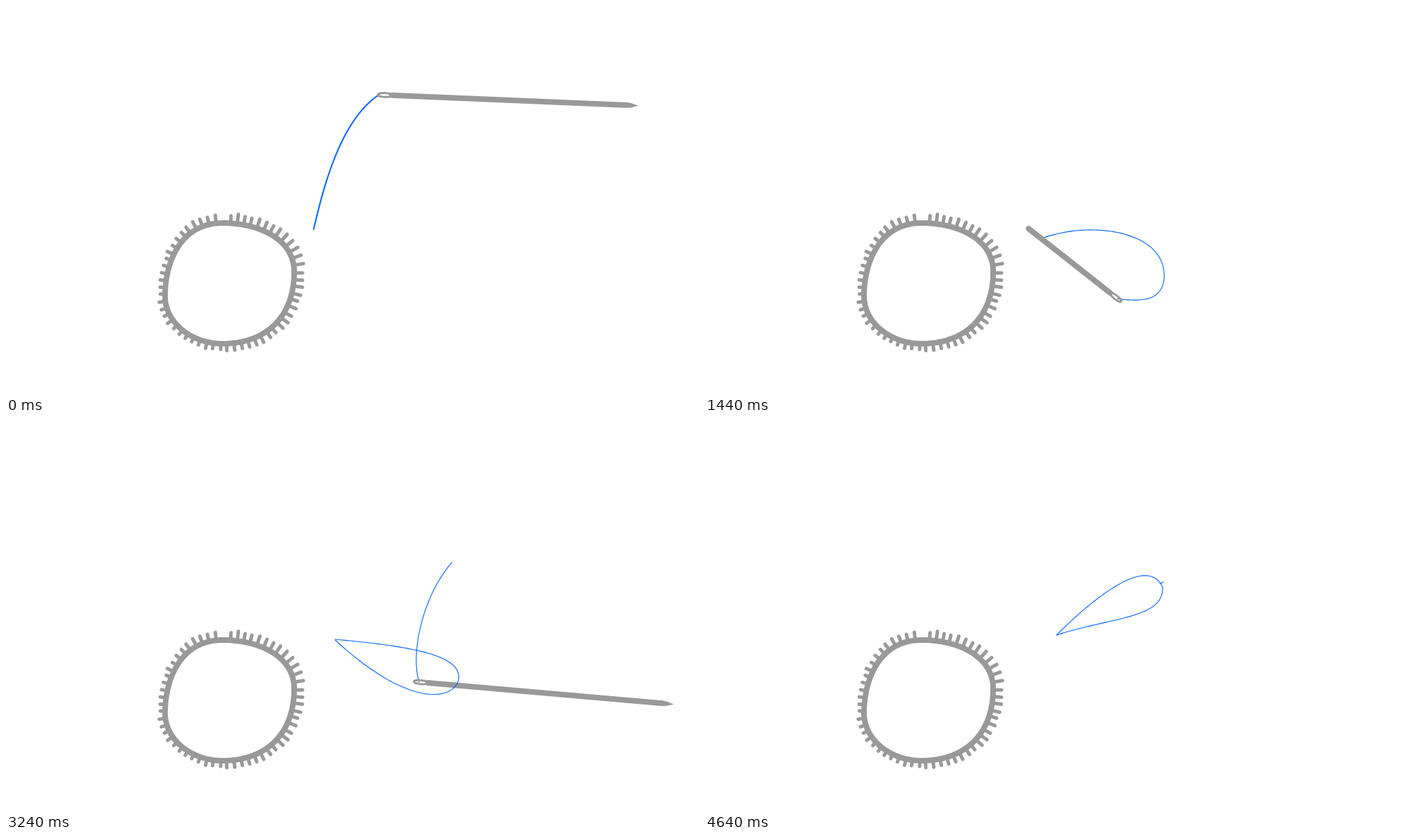
An HTML page with a canvas for the animation above (4760 ms loop, 998x561 px).

```html
<!DOCTYPE html>
<html lang="en">
<head>
<meta charset="utf-8">
<title>Chain stitch</title>
<style>
html, body { margin: 0; width: 100%; height: 100%; overflow: hidden; background: #fff; }
canvas { display: block; width: 998px; height: 561px; }
</style>
</head>
<body>
<canvas id="stage" width="998" height="561"></canvas>
<script>
const LOOP = 4760, STEP = 40, GREY = '#999', BLUE = '#0064fa';
const LENGTH = 375, SAMPLES = 80;
const HOLE_IN = [466, 321], HOLE_UP = [645.5, 206], HOLE_END = [658, 217];
// Needle phases in ms
const PIERCE = 1100, GONE = 1730, EMERGE = 2080, FREE = 2760, DIVE = 3920, DONE = 4520;
const ctx = document.getElementById('stage').getContext('2d');

const mix = (a, b, k) => a + (b - a) * k;
const dist = (a, b) => Math.hypot(a[0] - b[0], a[1] - b[1]);
const rad = deg => deg * Math.PI / 180;

// Samples a chain of cubic Beziers written as "x,y x,y ..."
function curve(text, count = SAMPLES) {
  const pts = text.trim().split(/\s+/).map(p => p.split(',').map(Number));
  const parts = (pts.length - 1) / 3;
  return Array.from({ length: count + 1 }, (_, j) => {
    const u = j / count * parts, i = Math.min(parts - 1, Math.floor(u));
    const k = u - i, q = 1 - k;
    const [a, b, c, d] = pts.slice(3 * i, 3 * i + 4);
    return [0, 1].map(m =>
      q * q * q * a[m] + 3 * q * q * k * b[m] + 3 * q * k * k * c[m] + k * k * k * d[m]);
  });
}

const pose = (t, text) => ({ t, pts: curve(text) });

function span(keys, t, time) {
  let i = 0;
  while (i < keys.length - 2 && t >= time(keys[i + 1])) i++;
  const t0 = time(keys[i]), t1 = time(keys[i + 1]);
  return [i, Math.max(0, Math.min(1, (t - t0) / (t1 - t0)))];
}

function morph(poses, t) {
  const [i, k] = span(poses, t, p => p.t);
  const b = poses[i + 1].pts;
  return poses[i].pts.map((p, j) => [mix(p[0], b[j][0], k), mix(p[1], b[j][1], k)]);
}

// Smooth motion through keys of [time, ...values]
function track(keys, t) {
  const [i, k] = span(keys, t, q => q[0]), last = keys.length - 1;
  const a = keys[i], b = keys[i + 1], h = b[0] - a[0];
  const slope = (j, m) => {
    const p = keys[Math.max(0, j - 1)], q = keys[Math.min(last, j + 1)];
    return (q[m] - p[m]) / (q[0] - p[0]);
  };
  const k2 = k * k, k3 = k2 * k, s = 3 * k2 - 2 * k3;
  return [1, 2, 3].map(m => mix(a[m], b[m], s)
    + h * (slope(i, m) * (k3 - 2 * k2 + k) + slope(i + 1, m) * (k3 - k2)));
}

// Needle keys: time, eye x, eye y, angle in degrees
const SWING = [
  [0, 536, 128, 2.4], [280, 625, 89, 43], [560, 770, 113, 85], [740, 885, 182, 124],
  [880, 866.5, 264.5, 155], [PIERCE, 826, 271, 172], [1440, 599, 426, 218], [1760, 468, 323, 222]
];
const FLIP = [
  [FREE, 645, 206, 88.5], [3240, 588, 373, 5], [3500, 720, 345, -80],
  [3720, 930, 208, -150], [DIVE, 1023, 112, -195.8], [4280, 810, 121, -212], [DONE, 660, 216, -212]
];

// Thread from the fabric to the eye, closing into a petal
const PETAL = '474,312 570,321 652,332 652,366 652,396 590,420 474,313';
const THREAD = [
  pose(0, '443,322 458,258 482,165 538,128'),
  pose(560, '441,326 480,235 600,120 768,113'),
  pose(880, '450,331 564,202 710,212 848,268'),
  pose(1120, '453,330 540,262 680,255 805,273'),
  pose(1440, '486,335 555,309 662,324 662,390 662,425 635,430 600,427'),
  pose(1880, PETAL)
];
const LOOPED = [
  pose(EMERGE, PETAL),
  pose(2720, '475,312 560,320 652,346 653,372 650,410 575,393 475,314'),
  pose(3240, PETAL),
  pose(3600, PETAL),
  pose(DIVE, '477,313 580,275 690,250 775,242 775,264 650,275 477,313'),
  pose(4400, '507,305 553,259 637,187 659,237 661,282 585,280 506,306')
];
const TAIL = [
  pose(FREE, '645,205 645,205 645,206 645,206'),
  pose(3240, '642,201 600,250 582,332 595,373'),
  pose(3500, '645,205 610,270 620,360 720,338'),
  pose(DIVE, '658,217 775,248 920,275 1016,114'),
  pose(4280, '659,222 740,240 800,200 805,125'),
  pose(DONE, '659,228 668,236 684,222 660,218'),
  pose(4640, '655,231.5 657,231 659,230 660,229')
];

const RING = curve(`312,313 367,313 415,338 415,383 415,449 374,487 312,487
  266,487 229,456 229,418 229,375 248,313 312,313`, 400);

// Bristles at even distances, longest at the upper right
function bristles() {
  let seed = 7, walked = 0;
  const random = () => (seed = seed * 16807 % 2147483647) / 2147483647;
  const list = [], gap = 9.9;
  for (let i = 1; i < RING.length; i++) {
    const [x, y] = RING[i], [px, py] = RING[i - 1];
    walked += dist(RING[i], RING[i - 1]);
    if (walked < gap) continue;
    walked -= gap;
    const out = Math.atan2(y - py, x - px) - Math.PI / 2;
    const size = 10.5 + 3 * Math.cos(out + rad(35)) + 3 * (random() - 0.5);
    list.push([[x, y], [x + size * Math.cos(out), y + size * Math.sin(out)]]);
  }
  return list;
}
const BRISTLES = bristles();

function line(pts, color, width) {
  ctx.strokeStyle = color;
  ctx.lineWidth = width;
  ctx.beginPath();
  pts.forEach(p => ctx.lineTo(p[0], p[1]));
  ctx.stroke();
}

// Needle pose, visible between the lengths from and to
function needleAt(t) {
  if (t > GONE && t < EMERGE || t >= DONE) return null;
  if (t >= EMERGE && t < FREE) {
    const angle = rad(88.5);
    const from = LENGTH * (1 - ((t - EMERGE) / (FREE - EMERGE)) ** 1.45);
    const eye = [HOLE_UP[0] - from * Math.cos(angle), HOLE_UP[1] - from * Math.sin(angle)];
    return { eye, angle, from, to: LENGTH };
  }
  const [x, y, deg] = track(t < EMERGE ? SWING : FLIP, t);
  const needle = { eye: [x, y], angle: rad(deg), from: 0, to: LENGTH };
  const hole = t >= DIVE ? HOLE_END : t > PIERCE && t < EMERGE ? HOLE_IN : null;
  if (hole) {
    needle.angle = Math.atan2(hole[1] - y, hole[0] - x);
    needle.to = Math.min(LENGTH, dist(needle.eye, hole));
  }
  return needle;
}

function drawNeedle({ eye, angle, from, to }) {
  if (to - from < 2) return;
  ctx.save();
  ctx.translate(...eye);
  ctx.rotate(angle);
  if (from === 0) {
    ctx.strokeStyle = GREY;
    ctx.lineWidth = 3;
    ctx.beginPath();
    ctx.ellipse(9.5, 0, 10, 2.8, 0, 0, 7);
    ctx.stroke();
  }
  const start = Math.max(from, 20), end = Math.min(to, 359);
  if (end > start) line([[start, 0], [end, 0]], GREY, 8);
  if (to === LENGTH) {
    const base = Math.max(from, 362);
    ctx.fillStyle = GREY;
    ctx.beginPath();
    ctx.moveTo(base, -4);
    ctx.lineTo(LENGTH, 0);
    ctx.lineTo(base, 4);
    ctx.fill();
  }
  ctx.restore();
}

// Bends the loose end of a thread onto the needle's eye
function attach(pts, needle, grip) {
  if (!needle) return pts;
  const end = pts[SAMPLES];
  const dx = needle.eye[0] + grip * Math.cos(needle.angle) - end[0];
  const dy = needle.eye[1] + grip * Math.sin(needle.angle) - end[1];
  return pts.map(([x, y], i) => {
    const k = (i / SAMPLES) ** 3;
    return [x + dx * k, y + dy * k];
  });
}

function draw(t) {
  ctx.fillStyle = '#fff';
  ctx.fillRect(0, 0, 998, 561);
  line(RING, GREY, 8);
  BRISTLES.forEach(b => line(b, GREY, 5));

  const needle = needleAt(t);
  const thread = pts => line(pts, BLUE, mix(2, 1.1, Math.min(1, t / 1500)));
  if (t < EMERGE) {
    // The thread slides through the eye as the needle turns
    const grip = 10 - 9 * Math.cos(2 * Math.PI * t / 1760);
    thread(attach(morph(THREAD, t), needle, grip));
    if (needle) drawNeedle(needle);
    return;
  }
  // The needle passes between the two sides of the petal
  const petal = morph(LOOPED, t), tip = SAMPLES / 2;
  thread(petal.slice(0, tip + 1));
  if (t >= FREE) thread(attach(morph(TAIL, t), needle, 7));
  if (needle) drawNeedle(needle);
  thread(petal.slice(tip));
}

ctx.lineCap = ctx.lineJoin = 'round';
function tick() {
  draw(Math.floor(performance.now() % LOOP / STEP) * STEP);
  requestAnimationFrame(tick);
}
tick();
</script>
</body>
</html>
```
